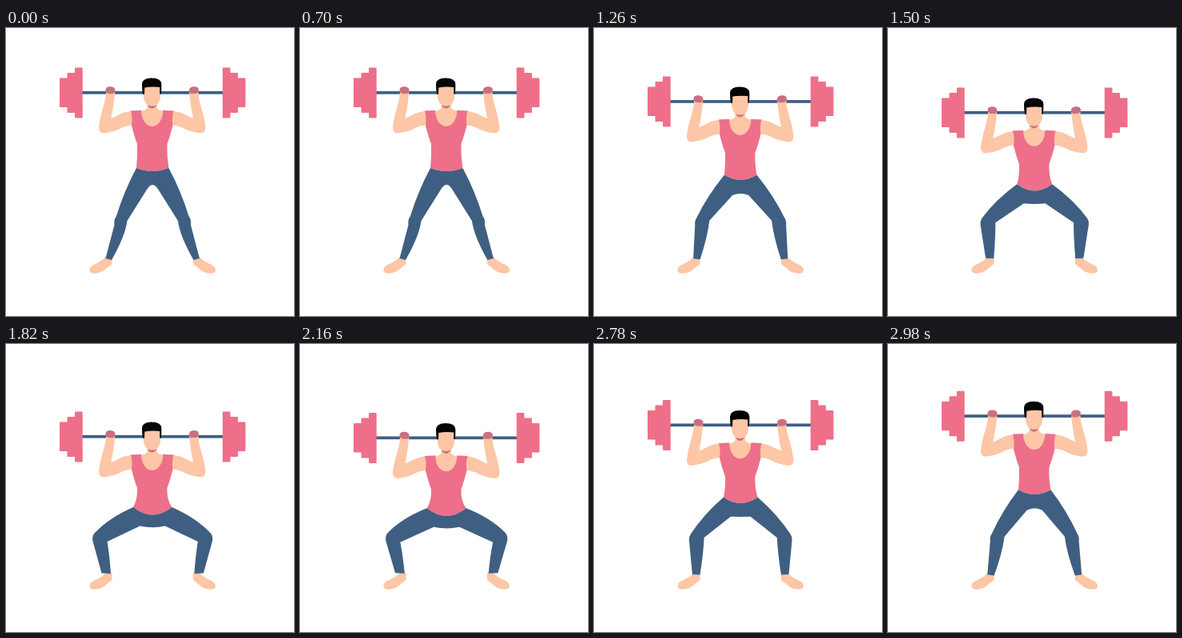
Animation, 360 px wide and 360 px high, one loop 3000 ms. Source, as an HTML page:

```html
<!DOCTYPE html>
<html lang="en">
<head>
<meta charset="utf-8">
<title>Barbell squat</title>
<style>
  html, body { margin: 0; width: 100%; height: 100%; overflow: hidden; background: #fff; }
  svg { display: block; width: 100vw; height: 100vh; }
  .skin { fill: #fdc6a6; }
  .pink { fill: #ee6f89; }
  .navy { fill: #3f5f82; }
  .grip { fill: #c96f80; }
  .hair { fill: #050505; }
</style>
</head>
<body>
<svg viewBox="0 0 360 360">
  <defs>
    <path id="foot" class="skin" d="M124.500 286 Q121 291 108.500 296.500 Q104 299.500 104.500 303.500 Q106 307.500 113 306.500 Q121 305.500 126 300 L132.500 295 L132.500 286 Z"/>
    <path id="plates" class="pink" d="M95.700 50.500 Q95.700 49.500 94.700 49.500 H87 Q86 49.500 86 50.500 V56 H77.500 Q76.500 56 76.500 57 V62.500 H68 Q67 62.500 67 63.500 V98 Q67 99 68 99 H76.500 V105 Q76.500 106 77.500 106 H86 V111.500 Q86 112.500 87 112.500 H94.700 Q95.700 112.500 95.700 111.500 Z"/>
    <g id="arm">
      <path class="skin" d="M125 80 Q125 88 122 97 Q117 113 116 124 Q115.700 131.500 122.500 131.500 Q137 129.500 146 124 Q152 121.500 157 121.500 L170 121 V103 L157 103.500 Q148 105 141 108.500 Q136 111.500 131.200 113 Q134.500 99 136.300 80 Z"/>
      <path class="grip" d="M124.500 77 Q125 73.500 130 73.200 Q135.500 73.300 136.500 77 Q136.700 80.500 134 82.300 L128 82 Q124.500 80.500 124.500 77 Z"/>
    </g>
  </defs>

  <use href="#foot"/>
  <use href="#foot" class="flip"/>
  <g class="lift">
    <rect class="navy" x="95" y="79" width="177" height="3.700"/>
    <use href="#plates"/>
    <use href="#plates" class="flip"/>
    <use href="#arm"/>
    <use href="#arm" class="flip upper"/>
    <path class="skin" d="M176.500 90 H189 V100 Q191 103 197.500 104 V128 H168 V104 Q175 103 176.500 100 Z"/>
  </g>
  <path id="shirt" class="pink"/>
  <path id="pants" class="navy"/>
  <g class="lift">
    <path class="grip" d="M176.500 94 H188.500 Q187 100.500 182.500 100.500 Q178 100.500 176.500 94 Z"/>
    <path class="skin" d="M172 71 H193 V86 Q192 97.500 182.500 97.800 Q173 97.500 172 86 Z"/>
    <path class="hair" d="M171 82.700 Q169.800 76.500 170 70 Q170.500 62.500 182 62.500 Q194 62.500 194.300 70 Q194.600 76.500 193.800 82.500 H192.200 V74 Q182 73 173.300 74.500 L173 82.700 Z"/>
  </g>
</svg>
<script>
const AXIS = 183.2, UPPER_AXIS = 182.7;
const PERIOD = 3000, LOWEST = 2100, TRAVEL = 1430, DEPTH = 36.5;
const shirt = document.getElementById('shirt');
const pants = document.getElementById('pants');
const lifts = document.querySelectorAll('.lift');
document.querySelectorAll('.flip').forEach(el => {
  const axis = el.classList.contains('upper') ? UPPER_AXIS : AXIS;
  el.setAttribute('transform', `translate(${2 * axis} 0) scale(-1 1)`);
});

// Left-leg points when standing, half way down and low: x, y for each pose
const POSES = {
  hip:    [163, 175, 162, 191, 159, 204],
  thigh:  [147.5, 204, 136.5, 213.5, 128, 217.5],
  knee:   [138, 235, 121, 238, 110, 237],
  shin:   [135.5, 246, 119.3, 246, 108.3, 246],
  ankle:  [124.5, 288, 123, 288, 119.5, 286.5],
  heel:   [132, 290, 132.5, 288.5, 131, 287],
  calf:   [149, 260, 137, 262, 129.5, 265],
  bend:   [151.5, 241, 138, 242, 126.5, 247],
  crotch: [176, 202, 171, 215.5, 167.5, 227.5],
};

// Quadratic through the three poses at depths 0, 20 and 35
const blend = (a, b, c, d) =>
  a * (d - 20) * (d - 35) / 700 - b * d * (d - 35) / 300 + c * d * (d - 20) / 525;

const fmt = ([x, y]) => `${x.toFixed(2)} ${y.toFixed(2)} `;
const mirror = ([x, y], axis = AXIS) => [2 * axis - x, y];

function depthAt(t) {
  const u = Math.max(0, 1 - Math.abs(t - LOWEST) / TRAVEL);
  const e = u < 0.5 ? 0.5 * (2 * u) ** 2.6 : 1 - 0.5 * (2 - 2 * u) ** 2.6;
  return DEPTH * e;
}

function draw(d) {
  const L = {}, R = {};
  for (const k in POSES) {
    const p = POSES[k];
    L[k] = [blend(p[0], p[2], p[4], d), blend(p[1], p[3], p[5], d)];
    R[k] = mirror(L[k]);
  }
  const waist = [AXIS, blend(183, 206, 223, d)];
  const arch = [AXIS, blend(190, 215.5, 231, d)];
  const at = (x, y) => fmt([x, y + d]);
  const atR = (x, y) => fmt(mirror([x, y + d], UPPER_AXIS));

  lifts.forEach(g => g.setAttribute('transform', `translate(0 ${d.toFixed(2)})`));

  shirt.setAttribute('d',
    'M' + at(156, 103.5) + 'L' + at(169, 103) +
    'C' + at(170, 129.5) + atR(170, 129.5) + atR(169, 103) +
    'L' + atR(156, 103.5) + 'Q' + atR(158.5, 112) + atR(157, 122) +
    'Q' + atR(160.5, 136) + atR(164, 145) + 'Q' + atR(164.5, 160) + fmt(R.hip) +
    'Q' + fmt(waist) + fmt(L.hip) +
    'Q' + at(164.5, 160) + at(164, 145) + 'Q' + at(160.5, 136) + at(157, 122) +
    'Q' + at(158.5, 112) + at(156, 103.5) + 'Z');

  pants.setAttribute('d',
    'M' + fmt(L.hip) + 'Q' + fmt(L.thigh) + fmt(L.knee) +
    'Q' + fmt([L.shin[0] - 0.8, L.knee[1] + 4]) + fmt(L.shin) +
    'L' + fmt(L.ankle) + 'L' + fmt(L.heel) +
    'Q' + fmt(L.calf) + fmt(L.bend) + 'L' + fmt(L.crotch) +
    'Q' + fmt(arch) + fmt(R.crotch) + 'L' + fmt(R.bend) +
    'Q' + fmt(R.calf) + fmt(R.heel) + 'L' + fmt(R.ankle) +
    'L' + fmt(R.shin) + 'Q' + fmt([R.shin[0] + 0.8, R.knee[1] + 4]) + fmt(R.knee) +
    'Q' + fmt(R.thigh) + fmt(R.hip) + 'Q' + fmt(waist) + fmt(L.hip) + 'Z');
}

let start;
function tick(now) {
  start ??= now;
  draw(depthAt((now - start) % PERIOD));
  requestAnimationFrame(tick);
}
draw(0);
requestAnimationFrame(tick);
</script>
</body>
</html>
```
